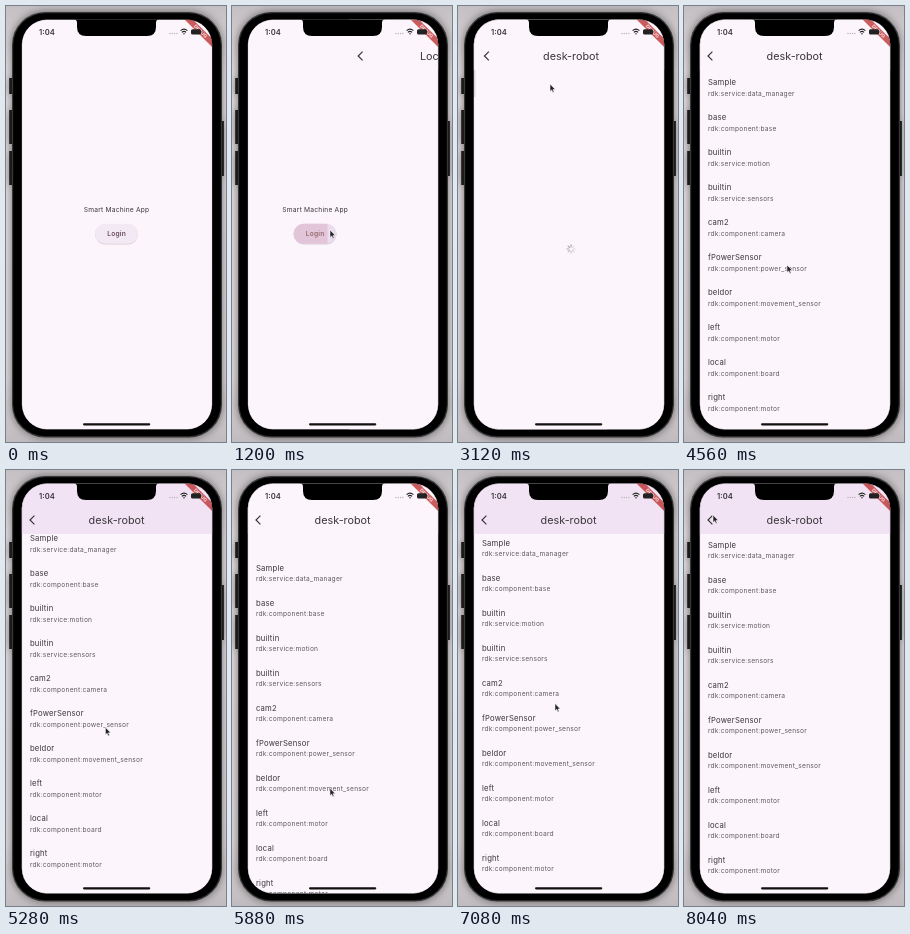
An HTML page that plays this animation: 220 px wide and 436 px high, repeating every 8160 ms.

```html
<!DOCTYPE html>
<html lang="en">
<head>
<meta charset="utf-8">
<title>Smart Machine App</title>
<style>
  html, body { margin: 0; width: 100%; height: 100%; overflow: hidden; background: #d9d4d7; }
  svg { display: block; width: 220px; height: 436px; }
  text { font-family: Inter, Roboto, sans-serif; fill: #3a363d; }
  .body, .sub { font-size: 6.65px; letter-spacing: .22px; }
  .sub { fill: #5f5a62; }
  .item { font-size: 7.7px; letter-spacing: .22px; }
  .title { font-size: 10.8px; }
  .mid { text-anchor: middle; }
  .phone { filter: drop-shadow(0 0 4px rgba(0, 0, 0, .5)); }
</style>
</head>
<body>
<svg viewBox="0 0 220 436">
  <defs>
    <clipPath id="screen"><rect x="15.8" y="13.6" width="190.4" height="409.8" rx="25"/></clipPath>
    <clipPath id="under"><rect x="15" y="64" width="192" height="361"/></clipPath>
    <clipPath id="pill"><rect x="89" y="217.7" width="43" height="20" rx="10"/></clipPath>
    <linearGradient id="wall" x2="0" y2="1">
      <stop offset="0" stop-color="#c4bfc2"/>
      <stop offset=".15" stop-color="#e2dde0"/>
      <stop offset=".85" stop-color="#ddd8db"/>
      <stop offset="1" stop-color="#c0bbbe"/>
    </linearGradient>
  </defs>
  <rect width="220" height="436" fill="url(#wall)"/>
  <g class="phone">
    <path d="M4.7 72V88M4.7 104V138M4.7 145V179M216.4 115V170" stroke="#1b1b1b" stroke-width="3"/>
    <rect x="6" y="6" width="210" height="425.5" rx="33" fill="#383638"/>
    <rect x="7.2" y="7.2" width="207.6" height="423" rx="32" fill="#000"/>
  </g>
  <g clip-path="url(#screen)">
    <rect x="15" y="13" width="192" height="412" fill="#fcf5fb"/>
    <g id="pages"></g>
    <g transform="translate(206.3 13.5) rotate(45)">
      <rect x="-20" y="13.7" width="40" height="5.9" fill="#b71c1c" opacity=".7"/>
      <text class="mid" y="18.4" font-size="4.8" font-weight="700" style="fill:#f6dfe2">DEBUG</text>
    </g>
    <path d="M67 13Q71 13 71 17V21Q71 30 80 30H141Q150 30 150 21V17Q150 13 154 13Z" fill="#000"/>
    <text x="33" y="28.6" font-size="7.6" font-weight="600">1:04</text>
    <path d="M164 27.5H171.5" stroke="#b9b2b9" stroke-width="1.4" stroke-linecap="round" stroke-dasharray="0 2.3"/>
    <g fill="none" stroke="#222" stroke-width="1.1">
      <path d="M174.6 24.6Q178 21.6 181.4 24.6M175.9 26.3Q178 24.5 180.1 26.3"/>
      <path d="M178 28.8L177 27.6Q178 26.9 179 27.6Z" fill="#222" stroke="none"/>
    </g>
    <rect x="185" y="23.2" width="10" height="5.2" rx="1.5" fill="#222"/>
    <rect x="195.5" y="24.9" width=".8" height="1.8" rx=".4" fill="#555"/>
    <rect x="77" y="417.2" width="67.3" height="2.2" rx="1.1" fill="#111"/>
  </g>
  <rect x="15.6" y="13.4" width="190.8" height="410.2" rx="25.2" fill="none" stroke="#000" stroke-opacity=".4"/>
  <g id="cursor"><path d="M0 0V8.3L1.9 6.6L3.2 9.5L4.6 8.9L3.3 6.1H5.9Z" transform="scale(.9)"
    fill="#222" stroke="#fff" stroke-width=".6"/></g>
</svg>
<script>
const LOOP = 8160, STEP = 120, WIDTH = 191, MID = 110.6;
const PAPER = '#fcf5fb', LILAC = '#f1e3f3';
const $ = id => document.getElementById(id);

const parts = `Sample service:data_manager
base component:base
builtin service:motion
builtin service:sensors
cam2 component:camera
fPowerSensor component:power_sensor
beldor component:movement_sensor
left component:motor
local component:board
right component:motor`.split('\n').map(line => line.split(' '));

// Cursor stops: time, x, y
const stops = [
  [120, 36, 172], [840, 98, 224], [1680, 98, 224], [1960, 92, 78], [3680, 92, 78],
  [4560, 103, 259], [5000, 100, 232], [5790, 98, 320], [6600, 97, 268], [7440, 97, 211], [8040, 29, 45]
];
const pushes = [1128, 2010, 2802];
const loaded = { 1: 1500, 3: 3840 };
const drag = { start: 4560, end: 6600, half: 820 };

const tile = '<rect class="tap" x="15" y="64" width="192" height="27" fill="#000" opacity="0"/>';
const spinner = '<g class="spin"></g>';
const row = name => `<g class="rows">${tile}<text class="item" x="24" y="80.5">${name}</text></g>`;

function page(title, content) {
  return `<g class="page">
    <rect x="15" y="13" width="192" height="412" fill="${PAPER}"/>
    <rect class="bar" x="15" y="13" width="192" height="51" fill="${PAPER}"/>
    <path d="M28.4 45.6L24 50L28.4 54.4" fill="none" stroke="#3a363d" stroke-width="1.2"/>
    <text class="title mid" x="${MID}" y="54">${title}</text>${content}</g>`;
}

const list = parts.map(([name, kind], i) =>
  `<text class="item" x="23.9" y="${79.3 + i * 35}">${name}</text>
   <text class="sub" x="23.9" y="${89.5 + i * 35}">rdk:${kind}</text>`).join('');

$('pages').innerHTML = `<g class="page">
    <text class="body mid" x="${MID}" y="205.6">Smart Machine App</text>
    <rect x="89" y="218.5" width="43" height="20" rx="10" fill="#000" opacity=".16"/>
    <rect id="login" x="89" y="217.7" width="43" height="20" rx="10"/>
    <g clip-path="url(#pill)"><rect id="ripple" x="89" y="217" width="34" height="21" fill="#e2c4d8"/></g>
    <text id="label" class="body mid" x="${MID}" y="230.2" font-weight="600">Login</text>
  </g>` +
  page('Locations', spinner + row('Home')) +
  page('Home', row('desk-robot')) +
  page('desk-robot', spinner + `<g clip-path="url(#under)"><g class="rows">${list}</g></g>`);

const pages = [...document.querySelectorAll('.page')];
const find = (i, name) => pages[i].querySelector('.' + name);
const show = (el, on) => el.setAttribute('visibility', on ? 'visible' : 'hidden');
const move = (el, x, y) => el.setAttribute('transform', `translate(${x} ${y})`);
const smooth = k => k * k * (3 - 2 * k);

function cursorAt(t) {
  const i = Math.max(1, stops.findIndex(s => s[0] >= t));
  const [t0, x0, y0] = stops[i - 1], [t1, x1, y1] = stops[i];
  const k = smooth(Math.min(1, Math.max(0, (t - t0) / (t1 - t0))));
  return [x0 + (x1 - x0) * k, y0 + (y1 - y0) * k];
}

// The list swings with the drag, then springs back after release.
function scrollAt(t) {
  if (t <= drag.start) return 0;
  const u = (Math.min(t, drag.end) - drag.start) / drag.half;
  const swing = (19.2 + 2.5 * u) * Math.sin(Math.PI * u);
  return t < drag.end ? swing : 1 + (swing - 1) * Math.exp((drag.end - t) / 200);
}

// cubic-bezier(.35, .91, .33, .97)
function ease(x) {
  if (x <= 0) return 0;
  if (x >= 1) return 1;
  const curve = (s, a, b) => 3 * (1 - s) ** 2 * s * a + 3 * (1 - s) * s * s * b + s ** 3;
  let lo = 0, hi = 1;
  for (let i = 0; i < 24; i++) {
    const s = (lo + hi) / 2;
    if (curve(s, .35, .33) < x) lo = s; else hi = s;
  }
  return curve(lo, .91, .97);
}

function spin(el, t) {
  const head = Math.floor(t / 125) % 8;
  let out = '';
  for (let i = 0; i < 8; i++) {
    const alpha = .12 + .4 * ((i - head + 15) % 8) / 7;
    out += `<path d="M0 -2V-4.2" stroke="#3c3c43" stroke-linecap="round"
      opacity="${alpha}" transform="translate(${MID} 243) rotate(${i * 45})"/>`;
  }
  el.innerHTML = out;
}

function draw(t) {
  const p = pushes.map(start => ease((t - start) / 400));
  pages.forEach((el, i) => {
    const enter = i ? p[i - 1] : 1, leave = i < 3 ? p[i] : 0;
    show(el, enter > 0 && leave < 1);
    move(el, WIDTH * (1 - enter) - 59 * leave, 0);
  });

  const pressed = t >= 1080;
  $('login').setAttribute('fill', t >= 960 ? '#ecdcef' : '#f2e9f5');
  $('ripple').setAttribute('opacity', pressed ? .9 : 0);
  $('label').style.fill = pressed ? '#94686c' : '#6b4a5c';

  for (const i in loaded) {
    const ready = t >= loaded[i], el = find(i, 'spin');
    find(i, 'rows').style.display = ready ? '' : 'none';
    el.style.display = ready ? 'none' : '';
    spin(el, t);
  }
  find(1, 'tap').setAttribute('opacity', t >= 1920 ? .1 : 0);
  find(2, 'tap').setAttribute('opacity', t >= 2880 ? .1 : 0);

  const scroll = scrollAt(t);
  move(find(3, 'rows'), 0, -scroll);
  find(3, 'bar').setAttribute('fill', scroll > 0 ? LILAC : PAPER);

  show($('cursor'), t >= 120);
  move($('cursor'), ...cursorAt(t));
}

const begin = performance.now();
function tick() {
  const t = (performance.now() - begin) % LOOP;
  draw(Math.floor(t / STEP) * STEP);
  requestAnimationFrame(tick);
}
tick();
</script>
</body>
</html>
```
